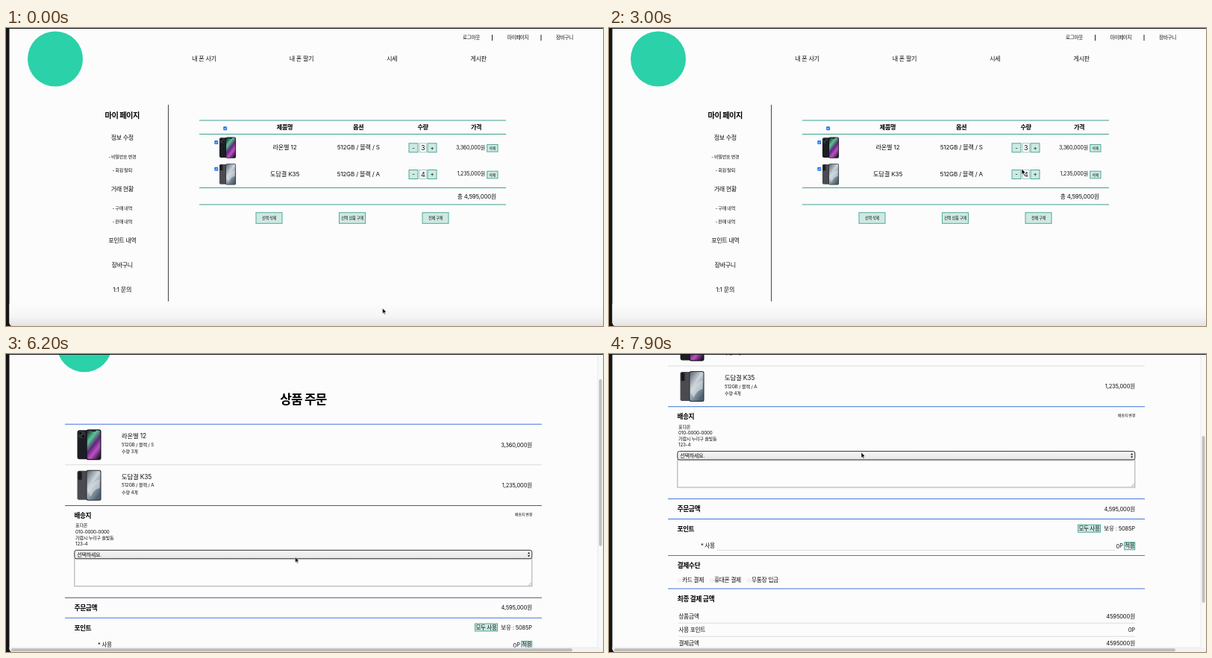
Write an HTML page that moves like this. It is 800 px wide and 400 px high and loops after 8000 ms.

```html
<!DOCTYPE html>
<html lang="ko">
<head>
<meta charset="utf-8">
<title>장바구니</title>
<style>
@property --scroll { syntax: "<number>"; inherits: true; initial-value: 0; }

html, body { margin: 0; width: 100%; height: 100%; overflow: hidden; background: #151515; }
svg { display: block; width: 100vw; height: 100vh; animation: scroll 8s linear infinite; }
text { font-family: Inter, "Noto Sans CJK KR", "Noto Sans CJK", sans-serif; fill: #111; letter-spacing: -.05em; white-space: pre; }
.mixed { letter-spacing: -.02em; }
.mid { text-anchor: middle; }
.end { text-anchor: end; }
.bold { font-weight: 700; fill: #000; }
.btn { fill: #cfe9e3; stroke: #4fa99a; }
.teal { stroke: #3fa08f; }
.blue { stroke: #4573e0; }
.pale { stroke: #dcdcdc; }
.dim { animation: tint 8s step-end infinite; }

.cart { animation: cart 8s step-end infinite; }
.order { animation: order 8s step-end infinite; }
.three { animation: three 8s step-end infinite; }
.four { animation: four 8s step-end infinite; }
.sheet { transform: translateY(calc(var(--scroll) * -1px)); }
.thumb { transform: translateY(calc(var(--scroll) * .575px)); }
.cursor { animation: cursor 8s ease-in-out infinite; }

@keyframes cart { 0% { visibility: visible } 58.75%, 100% { visibility: hidden } }
@keyframes order { 0% { visibility: hidden } 58.75%, 100% { visibility: visible } }
@keyframes three { 0% { opacity: 1 } 15% { opacity: 0 } 30%, 100% { opacity: 1 } }
@keyframes four { 0% { opacity: 0 } 15% { opacity: 1 } 30%, 100% { opacity: 0 } }
@keyframes tint { 0% { stroke: #4a5570 } 80%, 100% { stroke: #4573e0 } }
@keyframes scroll {
  0%, 73.75% { --scroll: 0 }
  77.5% { --scroll: 54 }
  81.25% { --scroll: 130 }
  86.25% { --scroll: 188 }
  90%, 100% { --scroll: 187 }
}
@keyframes cursor {
  0%, 1.25% { transform: translate(504.5px, 376px) }
  11.25%, 17.5% { transform: translate(570px, 158px) }
  22.5%, 32.5% { transform: translate(544.5px, 157.5px) }
  45% { transform: translate(570px, 252px) }
  47.5% { transform: translate(573px, 272px) }
  50%, 57.5% { transform: translate(571px, 257.5px) }
  66.25%, 68.75% { transform: translate(580.5px, 253.5px) }
  75%, 90% { transform: translate(387.5px, 272.5px) }
  97.5%, 100% { transform: translate(338px, 132px) }
}
</style>
</head>
<body>
<svg id="stage" viewBox="0 0 800 400" preserveAspectRatio="none">
  <defs>
    <linearGradient id="shade" x2="0" y2="1">
      <stop stop-color="#fcfcfc"/><stop offset=".6" stop-color="#f5f5f5"/><stop offset="1" stop-color="#e2e2e2"/>
    </linearGradient>
    <linearGradient id="field" x2="0" y2="1">
      <stop stop-color="#f6f6f6"/><stop offset="1" stop-color="#e6e6e6"/>
    </linearGradient>
    <linearGradient id="vivid" x1=".2" x2=".8" y2="1">
      <stop stop-color="#24463c"/><stop offset=".25" stop-color="#5cc596"/><stop offset=".5" stop-color="#5b2a78"/>
      <stop offset=".72" stop-color="#c04fc4"/><stop offset="1" stop-color="#2a1838"/>
    </linearGradient>
    <linearGradient id="misty" x2=".7" y2="1">
      <stop stop-color="#59636d"/><stop offset=".45" stop-color="#cdd5da"/><stop offset=".7" stop-color="#8797a5"/>
      <stop offset="1" stop-color="#4f6170"/>
    </linearGradient>
    <clipPath id="window"><path d="M4.5 1H800V400H9.500Q4.500 400 4.500 395Z"/></clipPath>
    <clipPath id="view"><rect x="4.500" y="1" width="788.500" height="393"/></clipPath>
    <g id="phoneA">
      <rect y="1" width="19" height="39" rx="3" fill="#1d1e23"/>
      <rect x="1.500" y="2.500" width="9" height="9" rx="2.500" fill="#34353b"/>
      <circle cx="4" cy="5" r="1.600" fill="#08080a"/><circle cx="8" cy="9" r="1.600" fill="#08080a"/>
      <rect x="12" width="20" height="41" rx="3" fill="#121217"/>
      <rect x="13.200" y="1.200" width="17.600" height="38.600" rx="2" fill="url(#vivid)"/>
      <rect x="19" y="1.200" width="6" height="1.600" rx=".8" fill="#121217"/>
    </g>
    <g id="phoneB">
      <rect y="1" width="19" height="39" rx="2.500" fill="#4a4b50"/>
      <rect x=".5" y="1.500" width="6" height="12" rx="2" fill="#2a2b2f"/>
      <circle cx="3.500" cy="4.500" r="1.500" fill="#101114"/><circle cx="3.500" cy="8" r="1.500" fill="#101114"/>
      <circle cx="3.500" cy="11.300" r="1.300" fill="#101114"/>
      <rect x="12" width="20" height="41" rx="2.500" fill="#292c31"/>
      <rect x="13" y="1" width="18" height="39" rx="2" fill="url(#misty)"/>
      <path d="M14 28Q20 16 30 12V24Q22 26 18 36Z" fill="#dfe5e8" opacity=".6"/>
    </g>
  </defs>
</svg>
<script>
const INK = '#222';

// y is the vertical middle of the line of text
const text = (x, y, str, size, cls = '') => {
  const mixed = /[0-9A-Z]/.test(str) ? 'mixed' : '';
  return `<text x="${x}" y="${y + size * .365}" font-size="${size}" class="${cls} ${mixed}">${str}</text>`;
};
const mid = (x, y, str, size, cls = '') => text(x, y, str, size, 'mid ' + cls);
const end = (x, y, str, size, cls = '') => text(x, y, str, size, 'end ' + cls);
const bold = (x, y, str, size) => text(x, y, str, size, 'bold');
const rect = (x, y, w, h, attrs) => `<rect x="${x}" y="${y}" width="${w}" height="${h}" ${attrs}/>`;
const rule = (x1, x2, y, cls) => `<path d="M${x1} ${y}H${x2}" class="${cls}"/>`;
const button = (x, y, w, h, str, size) =>
  rect(x, y, w, h, 'class="btn"') + mid(x + w / 2, y + h / 2, str, size);
const phone = (id, x, y, scale) =>
  `<use href="#phone${id}" transform="translate(${x} ${y}) scale(${scale})"/>`;
const check = (x, y) => rect(x - 2.5, y - 2.5, 5, 5, 'rx="1" fill="#1f74f0"') +
  `<path d="M${x - 1.3} ${y + .1}l1 1.200l1.700 -2.500" fill="none" stroke="#fff" stroke-width=".8"/>`;

const items = [
  { id: 'A', name: '라온별 12', spec: '512GB / 블랙 / S', price: '3,360,000원', count: 3 },
  { id: 'B', name: '도담결 K35', spec: '512GB / 블랙 / A', price: '1,235,000원', count: 4 }
];

function header(dx) {
  const top = [[623.5, '로그아웃'], [686, '마이페이지'], [748.5, '장바구니']];
  const menu = [[265.5, '내 폰 사기'], [396, '내 폰 팔기'], [517, '시세'], [633, '게시판']];
  return `<circle cx="${66 + dx}" cy="41.500" r="37" fill="#2bd1a8"/>` +
    top.map(([x, s]) => mid(x + dx, 13, s, 6.6)).join('') +
    menu.map(([x, s]) => mid(x + dx, 41.5, s, 8.2)).join('') +
    `<path d="M${651.5 + dx} 9v8M${717 + dx} 9v8" stroke="${INK}"/>`;
}

function sidebar() {
  const links = [
    [147, '정보 수정', 8.1], [172.5, '- 비밀번호 변경', 6.1], [190.5, '- 회원 탈퇴', 6.1],
    [216, '거래 현황', 8.1], [241.5, '- 구매 내역', 6.1], [259.5, '- 판매 내역', 6.1],
    [285, '포인트 내역', 8.1], [318, '장바구니', 8.1], [351, '1:1 문의', 8.1]
  ];
  return mid(155.7, 117, '마이 페이지', 10.2, 'bold') +
    links.map(([y, s, size]) => mid(155.7, y, s, size)).join('') +
    `<path d="M217.500 103V367" stroke="#444"/>`;
}

const both = (three, four) => `<g class="three">${three}</g><g class="four">${four}</g>`;

function cartRow(item, i) {
  const y = 160.5 + i * 35.7;
  const amount = n => mid(558.7, y + .3, n, 9);
  const price = s => end(642, y - .5, s, 7);
  return check(281.8, y - 7) + phone(item.id, 286, y - 14, .69) +
    mid(373.5, y, item.name, 8.2) + mid(472.3, y, item.spec, 8.1) +
    button(540, y - 5.7, 12, 12, '-', 8) +
    rect(554.2, y - 5.7, 9, 12, 'fill="#fff" stroke="#8cbfb5" stroke-width=".8"') +
    button(565, y - 5.7, 12, 12, '+', 8) +
    (i ? amount(item.count) + price(item.price)
       : both(amount(3) + price(item.price), amount(4) + price('4,480,000원'))) +
    button(644.7, y - 4, 14.3, 9.6, '삭제', 4.9);
}

function cart() {
  const heads = [[373.5, '제품명'], [472, '옵션'], [558.5, '수량'], [630, '가격']];
  return rect(4, 370, 796, 30, 'fill="url(#shade)"') + header(0) + sidebar() +
    [124, 142.5, 214.5, 237].map(y => rule(259, 670, y, 'teal')).join('') +
    check(293.7, 134.7) +
    heads.map(([x, s]) => mid(x, 133, s, 8.2, 'bold')).join('') +
    items.map(cartRow).join('') +
    both(end(657, 226, '총 4,595,000원', 7.8), end(657, 226, '총 5,715,000원', 7.8)) +
    button(335, 247.8, 35, 14.5, '선택 삭제', 5.2) +
    button(446.5, 247.8, 35, 14.5, '선택 상품 구매', 5.2) +
    button(558, 247.8, 35, 14.5, '전체 구매', 5.2);
}

function orderRow(item, i) {
  const y = 164.5 + i * 54.4;
  return phone(item.id, 95.5, y - 9, 1) + text(155, y, item.name, 8.4) +
    text(155, y + 11.5, item.spec, 6.1) + text(155, y + 21, `수량 ${item.count}개`, 6.1) +
    end(705, y + 11.7, item.price, 7.5);
}

function delivery() {
  const lines = ['표다온', '010-0000-0000', '가람시 누리구 솔빛동', '123-4'];
  return bold(91.5, 271, '배송지', 8.7) + end(705, 269.5, '배송지 변경', 5) +
    lines.map((s, i) => text(93, 284.5 + i * 8.2, s, 6.2)).join('') +
    rect(91.8, 329, 613, 37, 'fill="#fdfdfd" stroke="#a8a8a8"') +
    `<path d="M700 365l4 -4M702.500 365l1.500 -1.500" stroke="#888" stroke-width=".7"/>` +
    rect(91.8, 317.6, 613, 11.4, `rx="2.500" fill="url(#field)" stroke="#333"`) +
    text(95.3, 323.5, '선택하세요.', 7.1) +
    `<path d="M699 322.600l1.600 -2.600l1.600 2.600zM699 324.200l1.600 2.600l1.600 -2.600z" fill="${INK}"/>`;
}

function payment() {
  const ways = [[94.5, '카드 결제'], [137.5, '휴대폰 결제'], [187.5, '무통장 입금']];
  const sums = [['상품금액', '4595000원'], ['사용 포인트', '0P'], ['결제금액', '4595000원']];
  return bold(91.5, 395, '주문금액', 8.8) + end(705, 395, '4,595,000원', 7.5) +
    bold(91.5, 422, '포인트', 8.7) +
    button(628.5, 416.2, 30, 10, '모두 사용', 7.5) + end(705, 421.7, '보유 : 5085P', 7.5) +
    text(123, 444.5, '* 사용', 7.7) + rule(145, 678, 450.5, 'pale') +
    end(684, 445.2, '0', 7.5) + end(689, 444.2, 'P', 7.5) +
    button(690.7, 439.7, 14, 10, '적용', 7.5) +
    bold(91.5, 471, '결제수단', 8.8) +
    ways.map(([x, s]) =>
      `<circle cx="${x}" cy="491" r="2.200" fill="#fff" stroke="#d0d0d0" stroke-width=".6"/>` +
      text(x + 3.5, 490.5, s, 7.8)).join('') +
    bold(91.5, 515.5, '최종 결제 금액', 8.9) +
    sums.map(([label, sum], i) => {
      const y = 539 + i * 17.9;
      return text(93.3, y, label, 7.8) + end(705, y, sum, 7.6) + rule(93, 705, y + 9.2, 'pale');
    }).join('');
}

function order() {
  const blue = [148.5, 408.5, 457.5, 502].map(y => rule(79, 718, y, 'blue')).join('');
  const dim = [257.7, 381.4].map(y => rule(79, 718, y, 'dim')).join('');
  const sheet = header(39) + mid(398.3, 115.5, '상품 주문', 17, 'bold') + blue + dim +
    rule(79, 718, 203, 'pale') + items.map(orderRow).join('') + delivery() + payment();
  const bars = rect(793, 1, 7, 399, 'fill="#f8f8f8"') + rect(4, 394, 796, 6, 'fill="#f3f3f3"') +
    `<path d="M793 1V394H4" fill="none" stroke="#e6e6e6" stroke-width=".8"/>` +
    rect(794.6, 2.5, 4, 224, 'rx="2" fill="#c1c1c1" class="thumb"') +
    rect(7, 395.3, 752, 4, 'rx="2" fill="#bdbdbd"');
  return `<g clip-path="url(#view)"><g class="sheet">${sheet}</g></g>${bars}`;
}

const pointer = `<path class="cursor" d="M0 0V7.400L1.700 5.900L2.800 8.500L4.100 8L3 5.400L5.200 5.200Z"
  fill="#000" stroke="#fff" stroke-width=".6"/>`;

document.getElementById('stage').insertAdjacentHTML('beforeend', `
  <rect width="800" height="400" fill="#151515"/>
  <g clip-path="url(#window)">
    <rect width="800" height="400" fill="#fcfcfc"/>
    <g class="cart">${cart()}</g>
    <g class="order">${order()}</g>
  </g>${pointer}`);
</script>
</body>
</html>
```
